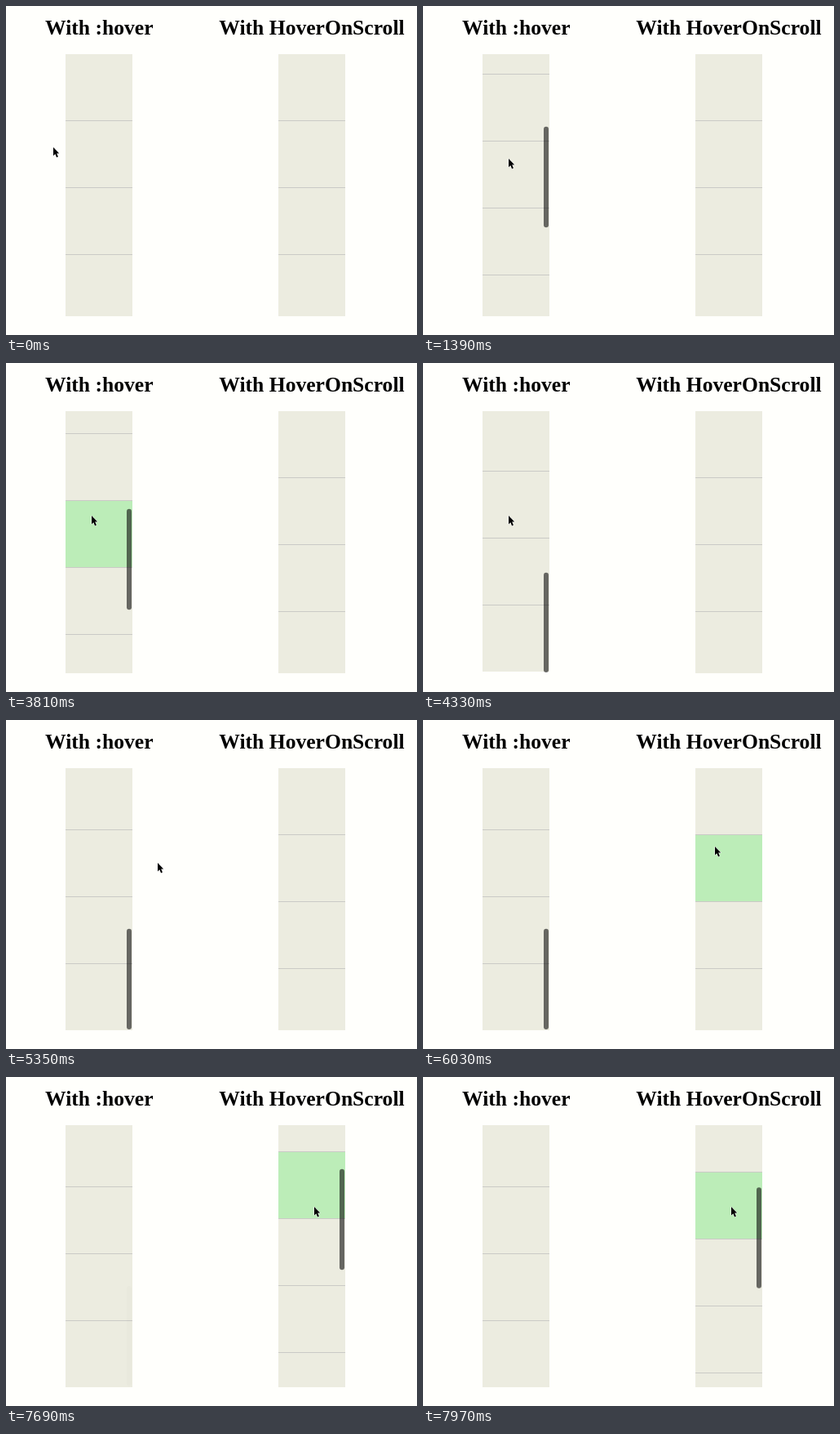
Write an HTML page that moves like this. It is 504 by 403 pixels and loops after 7.99 s.

```html
<!DOCTYPE html>
<html lang="en">
<head>
<meta charset="utf-8">
<title>Hover while scrolling</title>
<style>
  html, body { margin: 0; width: 100%; height: 100%; overflow: hidden; background: #fffffc; }
  svg { display: block; width: 504px; height: 403px; }
  text { font: bold 25.6px "Liberation Serif", "Times New Roman", serif; text-anchor: middle; }
  .item { fill: #ecece0; }
  .item.on { fill: #bcedb8; }
  .line { fill: #cacac6; }
  .thumb { fill: #000; }
</style>
</head>
<body>
<svg viewBox="0 0 504 403">
  <text x="114.3" y="35.4">With :hover</text>
  <text x="375" y="35.4">With HoverOnScroll</text>
  <g id="lists"></g>
  <path id="cursor" d="M0 0V10.4L2.3 8.3 4.1 12.4 5.9 11.6 4.2 7.6H7.2Z"
        stroke="#fff" stroke-width="1" paint-order="stroke"/>
</svg>
<script>
const LOOP = 7990, TOP = 59, VIEW = 321, PITCH = 82, COUNT = 10;

const ease = {
  linear: p => p,
  in: p => p * p,
  out: p => p * (2 - p),
  inOut: p => p * p * (3 - 2 * p),
  glide: p => (1 - Math.exp(-4 * p)) / (1 - Math.exp(-4))
};

// Each key: [time, value, easing used to reach it]
const cursorX = [[0, 58], [620, 105, 'inOut'], [5050, 105], [5800, 335, 'inOut'],
                 [6030, 358, 'out'], [6200, 358], [6550, 378, 'inOut']];
const cursorY = [[0, 173], [620, 187, 'inOut'], [5050, 187], [5800, 153, 'inOut'],
                 [6030, 155, 'out'], [6200, 155], [6550, 159, 'inOut']];
const leftScroll = [[0, 0], [850, 0], [1200, 141, 'in'], [2330, 300, 'glide'], [3860, 300],
                    [4100, 375, 'in'], [4320, 499], [4420, 506, 'out'], [4850, 498, 'inOut']];
const rightScroll = [[0, 0], [7320, 0], [7600, 87, 'in'], [7970, 188, 'out']];
const leftFade = [[0, 0], [850, 0], [910, 1], [7300, 1], [7700, 0]];
const rightFade = [[0, 0], [7320, 0], [7380, 1]];
// The plain hover only refreshes once scrolling has come to rest
const leftHover = [[0, 1], [2550, 5], [4900, 7]];

function at(keys, t) {
  const i = keys.findIndex(k => k[0] > t);
  if (i < 0) return keys[keys.length - 1][1];
  const [t0, v0] = keys[i - 1], [t1, v1, kind = 'linear'] = keys[i];
  return v0 + (v1 - v0) * ease[kind]((t - t0) / (t1 - t0));
}

const held = (keys, t) => keys.filter(k => k[0] <= t).pop()[1];

function add(parent, tag, attrs) {
  const el = document.createElementNS('http://www.w3.org/2000/svg', tag);
  for (const name in attrs) el.setAttribute(name, attrs[name]);
  return parent.appendChild(el);
}

function makeList(x) {
  const root = document.getElementById('lists');
  const clip = add(root, 'clipPath', { id: 'clip' + x });
  add(clip, 'rect', { x, y: TOP, width: PITCH, height: VIEW });
  const frame = add(root, 'g', { 'clip-path': `url(#clip${x})` });
  const content = add(frame, 'g', {});
  const items = [];
  for (let i = 0; i < COUNT; i++) {
    const y = TOP + i * PITCH;
    items.push(add(content, 'rect', { class: 'item', x, y, width: PITCH, height: PITCH - 1 }));
    if (i < COUNT - 1) {
      add(content, 'rect', { class: 'line', x, y: y + PITCH - 1, width: PITCH, height: 1 });
    }
  }
  const thumb = add(frame, 'rect', { class: 'thumb', x: x + 75, width: 6, rx: 3 });

  return {
    holds: px => px >= x && px < x + PITCH,
    draw(scroll, hovered, fade) {
      content.setAttribute('transform', `translate(0 ${-Math.round(scroll)})`);
      items.forEach((el, i) => el.classList.toggle('on', i === hovered));
      const y = 62 + scroll * 0.389;
      thumb.setAttribute('y', y);
      thumb.setAttribute('height', Math.min(123.5, 379 - y));
      thumb.setAttribute('opacity', 0.57 * fade);
    }
  };
}

const left = makeList(73), right = makeList(334);
const cursor = document.getElementById('cursor');

function render(now) {
  const t = now % LOOP;
  const x = at(cursorX, t), y = at(cursorY, t);
  const scroll = at(rightScroll, t);
  const under = Math.floor((y - TOP + scroll) / PITCH);
  left.draw(at(leftScroll, t), left.holds(x) ? held(leftHover, t) : -1, at(leftFade, t));
  right.draw(scroll, right.holds(x) ? under : -1, at(rightFade, t));
  cursor.setAttribute('transform', `translate(${Math.round(x)} ${Math.round(y)})`);
}

const start = performance.now();
function tick() {
  render(performance.now() - start);
  requestAnimationFrame(tick);
}
tick();
</script>
</body>
</html>
```
